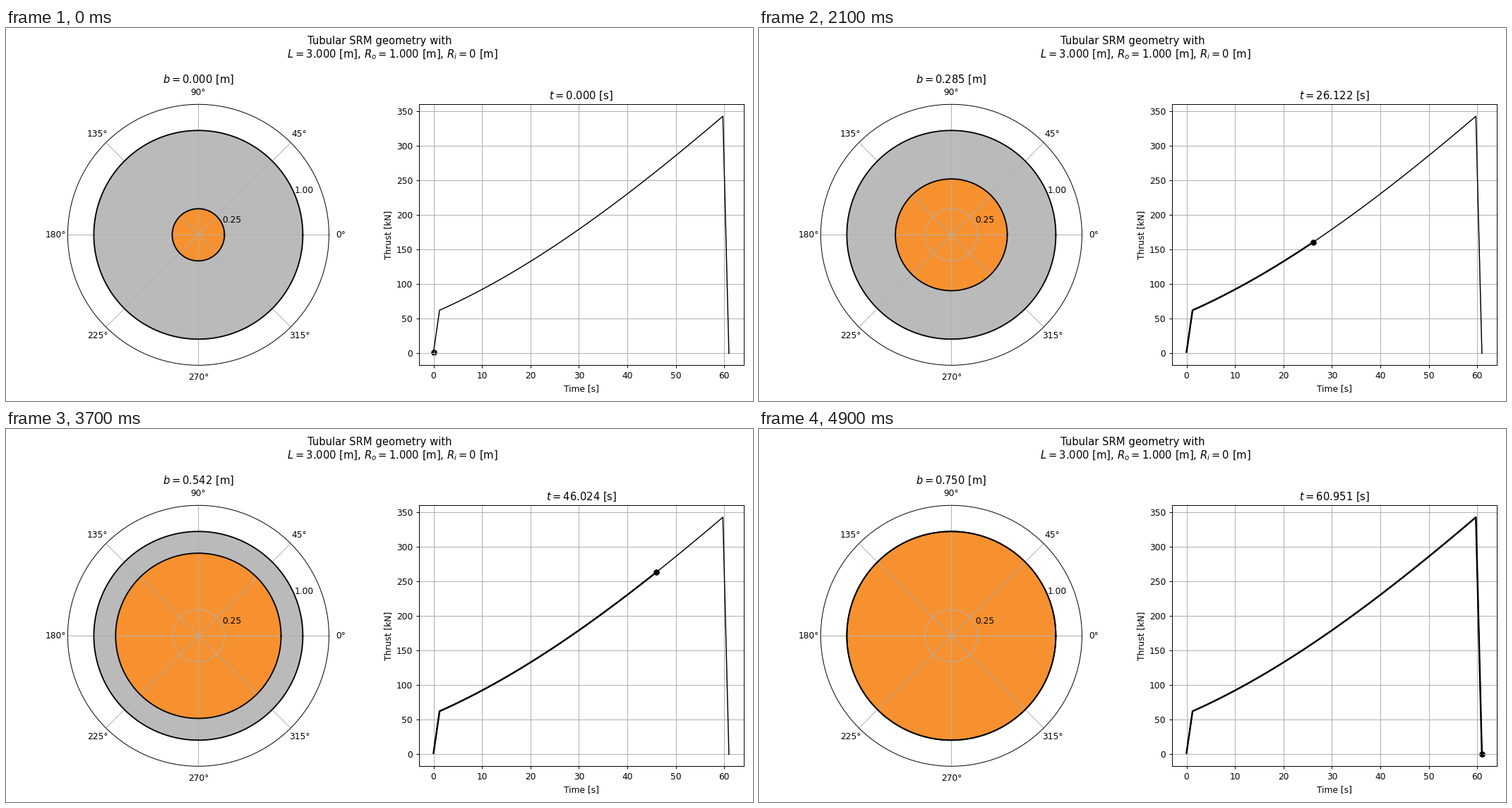
A matplotlib script for the animation above (5 s loop, 1058 px wide and 529 px high).

```python
import numpy as np
import matplotlib.pyplot as plt
from matplotlib.animation import FuncAnimation

W, H = 1058, 529
FIG_W, FIG_H = 12, 6
STEPS = 50
T_END = 60.951
R_IN, R_OUT = 0.25, 1.0
ORANGE, GRAY = "#f7912f", "#bababa"

plt.rcParams["font.family"] = "DejaVu Sans"

step = np.arange(STEPS)
time = step * T_END / (STEPS - 1)

# Port radius: r' ~ r^0.27 after a short ignition lag
POWER = 0.73
growth = 0.01308 * np.maximum(step - 0.33, 0)
radius = np.minimum((R_IN ** POWER + growth) ** (1 / POWER), R_OUT)
burnt = radius - R_IN

# Thrust: smooth rise between ignition and burnout
knots = [1, 9, 16, 25, 32, 41, 48]
levels = [62.4, 97.0, 132.7, 184.8, 229.7, 292.1, 343.0]
thrust = np.polyval(np.polyfit(knots, levels, 3), step)
thrust[0], thrust[-1] = 2, 0


def add_axes(fig, left, right, top=108.3, bottom=478.3, **kw):
    return fig.add_axes([left / W, 1 - bottom / H,
                         (right - left) / W, (bottom - top) / H], **kw)


fig = plt.figure(figsize=(FIG_W, FIG_H), dpi=W / FIG_W, facecolor="white")
fig.suptitle("Tubular SRM geometry with\n" + " " * 8
             + "$L = 3.000$ [m], $R_o = 1.000$ [m], $R_i = 0$ [m]")

# Cross-section of the grain
grain = add_axes(fig, 87.4, 457.4, projection="polar")
theta = np.linspace(0, 2 * np.pi, 361)
ring = np.ones_like(theta)
grain.fill(theta, R_OUT * ring, color=GRAY, lw=0)
port, = grain.fill(theta, R_IN * ring, color=ORANGE, lw=0)
grain.plot(theta, R_OUT * ring, "k", lw=1.5)
edge, = grain.plot(theta, R_IN * ring, "k", lw=1.5)
grain.set_rlim(0, 1.25)
grain.set_rticks([R_IN, R_OUT])
grain_title = grain.set_title("")

# Thrust curve
plot = add_axes(fig, 584.6, 1044.8)
plot.plot(time, thrust, "k", lw=1.2)
trace, = plot.plot([], [], "k", lw=2)
dot = plot.scatter([0], [thrust[0]], c="k")
plot.set_xlim(-0.05 * T_END, 1.05 * T_END)
plot.set_ylim(-0.05 * thrust.max(), 1.05 * thrust.max())
plot.set_xlabel("Time [s]")
plot.set_ylabel("Thrust [kN]")
plot.grid(True)
plot_title = plot.set_title("")


def draw(k):
    r = radius[k] * ring
    port.set_xy(np.column_stack([theta, r]))
    edge.set_ydata(r)
    trace.set_data(time[:k + 1], thrust[:k + 1])
    dot.set_offsets([[time[k], thrust[k]]])
    grain_title.set_text(f"$b = {burnt[k]:.3f}$ [m]")
    plot_title.set_text(f"$t = {time[k]:.3f}$ [s]")
    return port, edge, trace, dot, grain_title, plot_title


anim = FuncAnimation(fig, draw, frames=STEPS, interval=100,
                     init_func=lambda: draw(0), repeat=True, repeat_delay=0)
plt.show()
```
